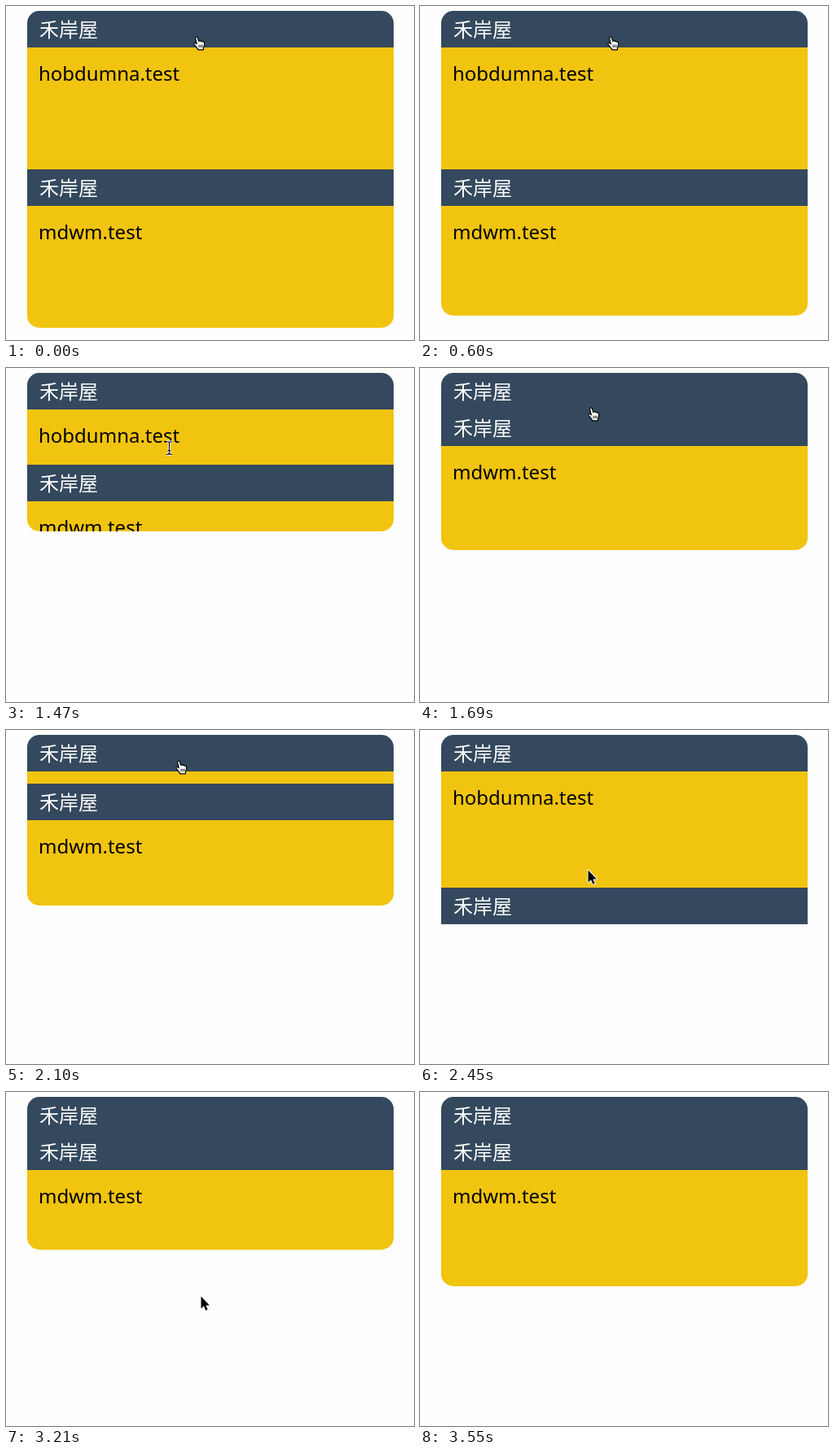
Write an HTML page that moves like this. It is 501 px wide and 411 px high and loops after 4.27 s.

```html
<!DOCTYPE html>
<html lang="zh">
<head>
<meta charset="utf-8">
<title>Accordion</title>
<style>
  html, body { margin: 0; width: 100%; height: 100%; overflow: hidden; background: #fefefe; }
  #stage { display: block; width: 501px; height: 411px; }
  .bar { fill: #34495e; }
  .body { fill: #f1c40f; }
  .title { font: 24px "Noto Sans CJK SC", "Noto Sans CJK", sans-serif; fill: #fff; }
  .text { font: 24px "Noto Sans", sans-serif; fill: #000; }
  .hand { fill: #fff; stroke: #000; stroke-width: 1.2; stroke-linejoin: round; }
  .arrow { fill: #000; stroke: #fff; stroke-width: 2; stroke-linejoin: round; paint-order: stroke; }
  .beam { fill: none; stroke: #000; stroke-width: 1.2; }
  .beam.under { stroke: #fff; stroke-width: 3; }
</style>
</head>
<body>
<svg id="stage" viewBox="0 0 501 411">
  <defs>
    <clipPath id="firstClip"><path id="firstShape"/></clipPath>
    <clipPath id="lastClip"><path id="lastShape"/></clipPath>
    <path id="beamPath" d="M-3.5 -8Q0 -8 0 -6V6Q0 8 -3.5 8M3.5 -8Q0 -8 0 -6M0 6Q0 8 3.5 8M-2 3H2"/>
  </defs>
  <path class="bar" d="M26 51V21A15 15 0 0 1 41 6H461A15 15 0 0 1 476 21V51Z"/>
  <text class="title" x="41" y="38">禾岸屋</text>
  <g clip-path="url(#firstClip)">
    <rect class="body" x="26" y="51" width="450" height="150"/>
    <text class="text" x="40" y="92">hobdumna.test</text>
  </g>
  <g id="second">
    <rect class="bar" x="26" width="450" height="45"/>
    <text class="title" x="41" y="32">禾岸屋</text>
  </g>
  <g clip-path="url(#lastClip)">
    <g id="lastBody">
      <rect class="body" x="26" width="450" height="150"/>
      <text class="text" x="40" y="41">mdwm.test</text>
    </g>
  </g>
  <g id="pointer">
    <g id="hand" class="hand">
      <path d="M-2 .6Q-1 -1.4 .8 .3L2.3 5Q3.4 3.5 4.8 5Q6 4 7 5.6Q9 5 9.1 7.5Q9.4 10.5 8 13L7.8 15.4H1.5Q0 13 -2.5 10Q-4.6 7.6 -3 6.8Q-1.6 6.6 -.2 8.4Z"/>
      <path d="M2.6 9.2V12.6M4.6 9.2V12.6M6.6 9.2V12.6" stroke-width=".9"/>
    </g>
    <path id="arrow" class="arrow" d="M0 0V15L3.4 11.8L5.8 17.2L8.2 16.2L5.9 10.9H10.4Z"/>
    <g id="beam">
      <use href="#beamPath" class="beam under"/>
      <use href="#beamPath" class="beam"/>
    </g>
  </g>
</svg>
<script>
const LOOP = 4270, START = 600, TICK = 58.1;
const FULL = 150, STEP = 7.5, BAR = 45, TOP = 51;

// [time, index of the panel that opens]
const clicks = [[565, 0], [1344, 1], [2049, 0], [2937, 1]];

// [time, x, y] of the pointer's hot spot
const route = [
  [0, 234, 38], [650, 234, 38], [1055, 206, 214], [1113, 201, 222], [1171, 193, 229],
  [1340, 193, 229], [1462, 200, 97], [1750, 212, 38], [2100, 212, 38],
  [2449, 206, 172], [2565, 199, 183], [2625, 199, 183], [2798, 191, 201],
  [2960, 191, 201], [3030, 186, 197], [3110, 188, 200], [3495, 397.5, 406]
];
const LEAVE = 3540;

const $ = id => document.getElementById(id);
const show = (id, on) => $(id).setAttribute("display", on ? "inline" : "none");
const move = (id, x, y) => $(id).setAttribute("transform", `translate(${x} ${y})`);

// A closing panel steps every 10 ms, an opening one every 20 ms and stops one step short.
function heights(t) {
  const h = [FULL, FULL];
  for (const [at, open] of clicks) {
    if (t < at) break;
    const other = 1 - open;
    h[other] = Math.max(0, h[other] - STEP * Math.floor((t - at) / 10));
    h[open] = Math.max(h[open], Math.min(FULL - STEP, STEP * Math.floor((t - at) / 20)));
  }
  return h;
}

function pointerAt(t) {
  const i = route.findIndex(p => p[0] > t);
  if (i < 0) return route[route.length - 1].slice(1);
  const [t0, x0, y0] = route[i - 1], [t1, x1, y1] = route[i];
  const k = (t - t0) / (t1 - t0);
  return [x0 + (x1 - x0) * k, y0 + (y1 - y0) * k];
}

function pointerKind(x, y, h) {
  const bar2 = TOP + h[0], body2 = bar2 + BAR;
  const within = (top, size) => y >= top && y < top + size;
  const overText = (top, size, right) =>
    x > 41 && x < right && within(top + 15, Math.min(34, size - 15));
  if (x < 26 || x > 476) return "arrow";
  if (within(6, BAR) || within(bar2, BAR)) return "hand";
  if (overText(TOP, h[0], 213) || overText(body2, h[1], 168)) return "beam";
  return "arrow";
}

function bodyPath(top, bottom, radius) {
  const r = Math.min(radius, bottom - top);
  return `M26 ${top}H476V${bottom - r}A${r} ${r} 0 0 1 ${476 - r} ${bottom}` +
    `H${26 + r}A${r} ${r} 0 0 1 26 ${bottom - r}Z`;
}

function draw(time) {
  const t = time < START ? 0 : 590 + TICK * Math.floor((time - 584) / TICK);
  const h = heights(t);
  const bar2 = Math.round(TOP + h[0]);
  const body2 = bar2 + BAR;
  const end = Math.round(TOP + h[0] + BAR + h[1]);

  $("firstShape").setAttribute("d", bodyPath(TOP, bar2, 0));
  $("lastShape").setAttribute("d", bodyPath(body2, Math.max(body2, end), 15));
  move("second", 0, bar2);
  move("lastBody", 0, body2);

  const [x, y] = pointerAt(t);
  const kind = pointerKind(x, y, h);
  for (const id of ["hand", "arrow", "beam"]) show(id, id === kind);
  show("pointer", t < LEAVE);
  move("pointer", Math.round(x) + 0.5, Math.round(y) + 0.5);
}

const begin = performance.now();
function frame() {
  draw((performance.now() - begin) % LOOP);
  requestAnimationFrame(frame);
}
frame();
</script>
</body>
</html>
```
